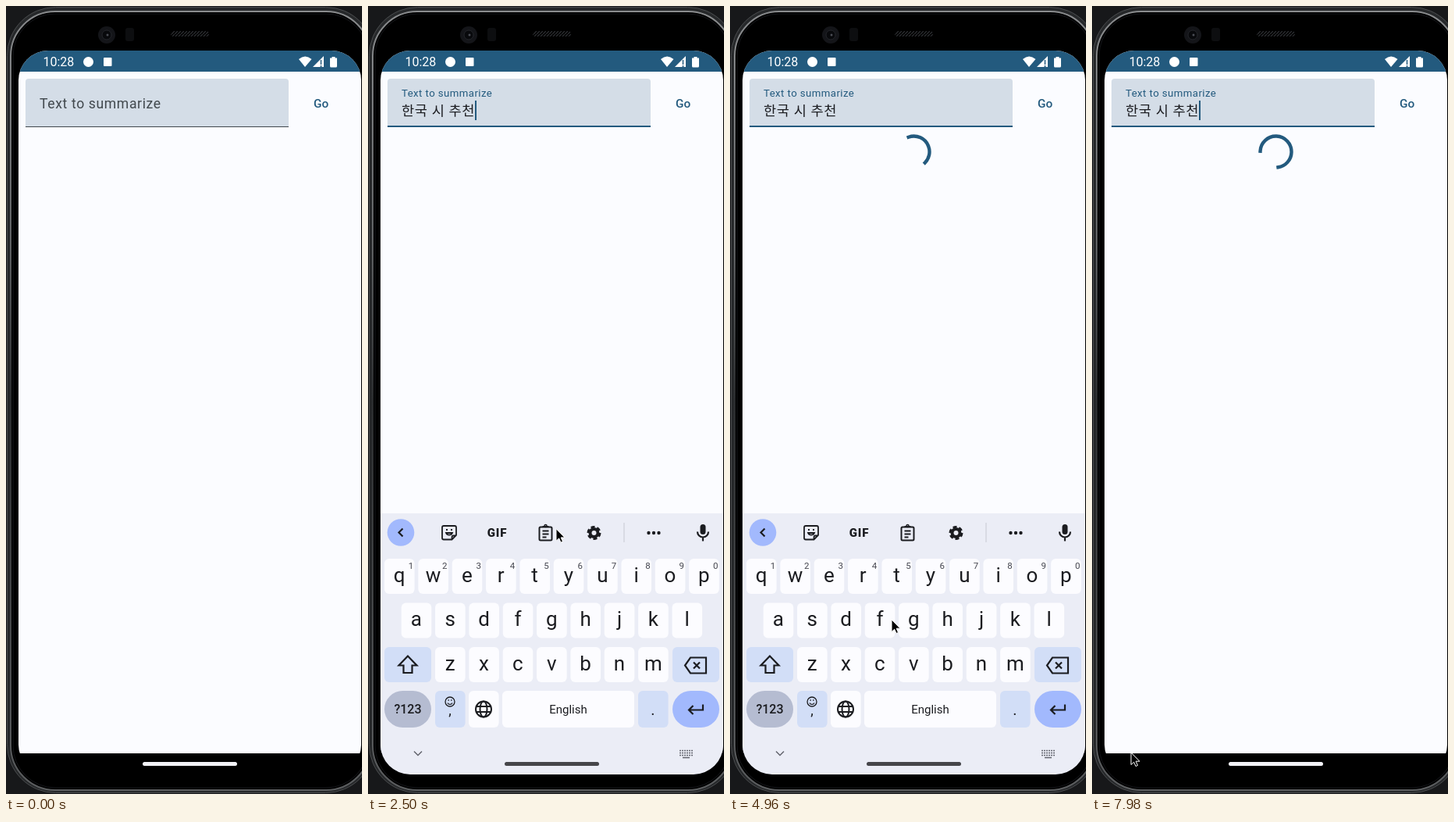
Animation of 456x1008 px, one loop 8 s. Source, as an HTML page:

```html
<!DOCTYPE html>
<html lang="en">
<head>
<meta charset="utf-8">
<title>Summarize</title>
<style>
  html, body { margin: 0; width: 100%; height: 100%; overflow: hidden; background: #17181a; }
  svg {
    --ink: #1b1c20; --primary: #235a7e; --accent: #a2b9fd; --grey: #d2def7;
    display: block; width: 456px; height: 1008px;
    font-family: Roboto, "Noto Sans CJK KR", "Noto Sans CJK", sans-serif;
  }
  .line { fill: none; stroke: var(--ink); stroke-width: 2.2; }
  .faint { fill: none; stroke: #63656e; stroke-width: 1.5; }
  .primary { fill: var(--primary); }
  .page { fill: #fbfcff; }
  .body { font-size: 17.6px; }
  #ime { fill: var(--ink); text-anchor: middle; }
  .accent { fill: var(--accent); }
  .key { fill: #fcfcff; }
  .grey { fill: var(--grey); }
  .pill { fill: #b5bcd1; }
  .letter { font-size: 26px; }
  .hint { font-size: 11.5px; fill: #45464f; }
</style>
</head>
<body>
<svg viewBox="0 0 456 1008">
  <defs>
    <clipPath id="screen">
      <rect x="16" y="57" width="439" height="926" rx="38"/>
    </clipPath>
    <linearGradient id="rim" x2="0" y2="1">
      <stop offset="0" stop-color="#8a8c8e"/>
      <stop offset=".3" stop-color="#606264"/>
      <stop offset=".5" stop-color="#2b2d2f"/>
      <stop offset="1" stop-color="#5c5e60"/>
    </linearGradient>
    <pattern id="mesh" width="4" height="4" patternUnits="userSpaceOnUse">
      <path d="M0 4L4 0" stroke="#303236" stroke-width="1.2"/>
    </pattern>
    <g id="clip" fill="none">
      <rect x="-8" y="-8" width="16" height="17" rx="1.5" stroke-width="2"/>
      <path d="M-4-8.5h8M-4-3h8M-4 1h8M-4 5h5" stroke-width="2"/>
      <circle cy="-9.5" r="1.5" stroke-width="1.5"/>
    </g>
  </defs>

  <!-- phone body -->
  <rect x="1.5" y="1.5" width="470" height="1005" rx="62" fill="#26282a" stroke="#4c4e50"/>
  <rect x="6" y="7" width="461" height="996" rx="57" stroke="url(#rim)" stroke-width="2"/>
  <rect x="9" y="10" width="455" height="990" rx="54" stroke="#15161a"/>
  <circle cx="129" cy="37" r="11" fill="#141519"/>
  <circle cx="129" cy="37" r="6" fill="#08090c" stroke="#24262b"/>
  <circle cx="130" cy="37" r="1.5" fill="#4a4d55"/>
  <rect x="153" y="28" width="11" height="17" rx="3" fill="#0d0e10"/>
  <rect x="211" y="32" width="49" height="7" rx="3.5" fill="url(#mesh)"/>

  <g clip-path="url(#screen)">
    <rect class="page" x="16" y="57" width="439" height="899"/>
    <rect x="16" y="956" width="439" height="27"/>
    <rect class="primary" x="16" y="57" width="439" height="27"/>

    <!-- status bar -->
    <g fill="#fff">
      <text x="47.5" y="77" font-size="16">10:28</text>
      <circle cx="105.5" cy="71.5" r="6.5"/>
      <rect x="125" y="66" width="10.5" height="11" rx="1"/>
      <path d="M375 68Q383 61 391.5 68L383 78Z"/>
      <path d="M393 78L407 64V78Z"/>
      <path class="line" d="M403.5 69v6m0 1v2" style="stroke: var(--primary); stroke-width: 1.5"/>
      <path d="M415 66.5h2.5V65h4v1.5H424V77a1.5 1.5 0 0 1-1.5 1.5h-6A1.5 1.5 0 0 1 415 77Z"/>
    </g>

    <!-- text field -->
    <path d="M25 155V97a4 4 0 0 1 4-4H358a4 4 0 0 1 4 4V155Z" fill="#d4dde7"/>
    <rect id="rule" x="25" width="337"/>
    <text id="label" x="43">Text to summarize</text>
    <text id="value" class="body" x="43" y="140" letter-spacing=".64"></text>
    <rect id="caret" class="primary" width="2" height="25"/>
    <text class="primary" x="394" y="130" font-size="15.4" font-weight="500" letter-spacing=".1">Go</text>

    <circle id="spinner" cx="235.5" cy="186.5" r="20" fill="none" style="stroke: var(--primary)"
      stroke-width="4.4" stroke-linecap="square" pathLength="360"/>

    <!-- keyboard -->
    <g id="ime">
      <rect x="16" y="649" width="439" height="430" fill="#ebedf6"/>
      <g id="keys"></g>

      <circle class="accent" cx="42" cy="673.5" r="17.3"/>
      <path id="arrow" class="line" d="M-2.5-5l5 5-5 5"/>
      <rect x="425.5" y="663" width="7" height="13" rx="3.5"/>
      <path class="line" d="M422 672.5a7 7 0 0 0 14 0M429 680v4.5"/>

      <g id="chip">
        <rect class="key" x="175.5" y="656.5" width="129" height="35" rx="8" stroke="#d6d8e2"/>
        <use href="#clip" x="195" y="674.5" style="stroke: var(--accent)"/>
        <text x="250.5" y="679.5" font-size="16">한국 시 추천</text>
      </g>

      <g id="tools">
        <g class="line" style="stroke-width: 1.8">
          <path d="M97 665h14a2 2 0 0 1 2 2v10l-5.500 5.500H97a2 2 0 0 1-2-2V667a2 2 0 0 1 2-2ZM113 677.500h-3.500a2 2 0 0 0-2 2v3"/>
          <path d="M100 674a4.300 4.300 0 0 0 8 0ZM100 670h2m4 0h2"/>
        </g>
        <text x="165.5" y="679" font-size="15" font-weight="900" letter-spacing=".8">GIF</text>
        <use href="#clip" x="227.5" y="674.5" style="stroke: var(--ink)"/>
        <circle class="line" cx="289.5" cy="674" r="5" style="stroke-width: 4"/>
        <circle class="line" cx="289.5" cy="674" r="7.5" pathLength="48" stroke-dasharray="5 3" style="stroke-width: 3"/>
        <path d="M328 661v25" stroke="#c6c8d2"/>
        <circle cx="359.5" cy="674" r="2.2"/><circle cx="366" cy="674" r="2.2"/><circle cx="372.5" cy="674" r="2.2"/>
      </g>

      <path class="line" d="M51 831.5L39.5 843.5H45.5V853H56.5V843.5H62.5Z"/>
      <path class="line" d="M413 833.5H433V853.5H413L406 843.5ZM417 839.5l8 8m0-8l-8 8"/>
      <path class="line" d="M429 893.5v7H411m5.5-5.5l-5.5 5.5 5.5 5.5"/>
      <g class="line" style="stroke-width: 2">
        <circle cx="148" cy="899.5" r="10"/>
        <ellipse cx="148" cy="899.5" rx="4.5" ry="10"/>
        <path d="M139 896h18m-18 7h18"/>
      </g>
      <g class="line" style="stroke-width: 1.3">
        <circle cx="105" cy="890" r="6"/>
        <path d="M102 891.5a3.3 3.3 0 0 0 6 0M102.5 888h1.4m2.2 0h1.4"/>
      </g>
      <text x="51" y="905" font-size="16" font-weight="500">?123</text>
      <text x="256.5" y="905" font-size="15">English</text>
      <text x="105" y="907" font-size="18">,</text>
      <text x="365" y="907" font-size="20">.</text>

      <rect id="ripple" x="16" y="930" width="95" height="54" rx="47" ry="27" opacity=".1"/>
      <path class="faint" d="M59 953.5l5 5 5-5"/>
      <path class="faint" d="M399 952.5h17m-17 3h17m-17 3h17" stroke-dasharray="2 1"/>
      <path class="faint" d="M403 961.5h9"/>
    </g>

    <rect id="handle" x="175" y="967" width="121" height="5" rx="2.5"/>
  </g>

  <path id="pointer" d="M0 0V15.5L3.7 12.2 6 17.5 8.5 16.4 6.2 11.2H11Z" stroke="#fff"/>
</svg>

<script>
  const LOOP = 8000, STEP = 20;
  const FOCUS = 1000, PASTE = 2380, LOAD = 3910, CLOSE = 5980;
  const PITCH = 43.35, KEY_W = 38.6;
  const $ = id => document.getElementById(id);

  const clamp = x => Math.min(1, Math.max(0, x));
  const ramp = (t, from, to) => clamp((t - from) / (to - from));
  const mix = (a, b, p) => a + (b - a) * p;
  const smooth = p => p * p * (3 - 2 * p);
  const show = (id, on) => $(id).setAttribute('visibility', on ? 'inherit' : 'hidden');
  const set = (id, attrs) => {
    for (const k in attrs) $(id).setAttribute(k, attrs[k]);
  };

  // Interpolates rows of [time, ...values].
  function track(rows, t, ease = p => p) {
    let i = 0;
    while (i < rows.length - 2 && t >= rows[i + 1][0]) i++;
    const [a, b] = [rows[i], rows[i + 1]];
    const p = ease(ramp(t, a[0], b[0]));
    return a.slice(1).map((v, k) => mix(v, b[k + 1], p));
  }

  // cubic-bezier(.4, 0, .2, 1)
  function standard(x) {
    let lo = 0, hi = 1, s = .5;
    for (let i = 0; i < 24; i++) {
      s = (lo + hi) / 2;
      const r = 1 - s;
      if (1.2 * r * r * s + .6 * r * s * s + s ** 3 < x) lo = s; else hi = s;
    }
    return 3 * s * s - 2 * s ** 3;
  }

  function buildKeys() {
    let out = '';
    const key = (x, y, w, cls = 'key', h = 45, r = 6) =>
      out += `<rect class="${cls}" x="${x}" y="${y}" width="${w}" height="${h}" rx="${r}"/>`;
    const text = (x, y, s, cls) => out += `<text class="${cls}" x="${x}" y="${y}">${s}</text>`;
    [['qwertyuiop', 21, 707], ['asdfghjkl', 42.7, 763.5], ['zxcvbnm', 86, 820]].forEach(([row, x0, y], r) =>
      [...row].forEach((c, i) => {
        const x = x0 + i * PITCH;
        key(x, y, KEY_W);
        text(x + 19.2, y + 29.5, c, 'letter');
        if (!r) text(x + 34, y + 13, (i + 1) % 10, 'hint');
      }));
    key(21, 820, 60, 'grey');
    key(390, 820, 60, 'grey');
    key(21, 876, 60, 'pill', 47, 23.5);
    key(86, 876, KEY_W, 'grey', 47);
    key(129, 876, KEY_W, 'key', 47);
    key(172, 876, 169, 'key', 47);
    key(346, 876, KEY_W, 'grey', 47);
    key(390, 876, 60, 'accent', 47, 23.5);
    $('keys').innerHTML = out;
  }

  const pointerPath = [
    [740, -14, 300], [960, 115, 140], [1040, 115, 140], [1400, 197, 127], [1700, 197, 127],
    [2080, 240, 672], [2480, 240, 672], [2920, 405, 125], [3980, 405, 125],
    [4360, 207, 785], [5380, 207, 785], [5740, 50, 955], [LOOP, 50, 955]
  ];
  // Loader time runs about four times faster than the page.
  const loaderClock = [[LOAD, 0], [4960, 4238], [6000, 8434], [7980, 16772], [LOOP, 16856]];
  const imeSlide = [
    [1460, 88, 0], [1540, 0, 1], [CLOSE, 0, 1], [6000, 16, .72], [6040, 88, 0], [LOOP, 88, 0]
  ];
  const handleShade = [[1530, 242], [1560, 200], [1640, 70], [6010, 70], [6110, 242], [LOOP, 242]];

  function drawField(t) {
    const up = smooth(ramp(t, 1020, 1080));
    const focused = t > 1020, pasted = t >= PASTE;
    $('label').style.fontSize = mix(17.6, 13.2, up) + 'px';
    set('label', {
      y: mix(131, 116, up),
      'letter-spacing': mix(.62, .44, up),
      fill: focused ? 'var(--primary)' : '#41484d'
    });
    set('rule', focused ? { y: 153, height: 2, fill: 'var(--primary)' } : { y: 154, height: 1, fill: '#41484d' });
    $('value').textContent = pasted ? '한국 시 추천' : 'Enter text or a URL to summarize';
    set('value', { fill: pasted ? 'var(--ink)' : '#41484d', opacity: ramp(t, 1050, 1110) });

    const blink = (t - (pasted ? PASTE : FOCUS)) % 243 < 121.5;
    show('caret', t >= FOCUS && blink);
    set('caret', { x: pasted ? 137 : 43, y: mix(130, 121, up) });
  }

  function drawSpinner(t) {
    show('spinner', t >= LOAD);
    const [ms] = track(loaderClock, t);
    const turn = Math.floor(ms / 1332), p = ms % 1332;
    const head = 290 * standard(clamp(p / 666));
    const tail = 290 * standard(clamp(p / 666 - 1));
    const start = -90 + 216 * turn + 286 * p / 1332 + tail;
    set('spinner', {
      'stroke-dasharray': `${Math.max(.1, head - tail)} 720`,
      transform: `rotate(${start % 360} 235.5 186.5)`
    });
  }

  function drawKeyboard(t) {
    const closing = t >= CLOSE, menu = t >= PASTE && !closing;
    const [drop, alpha] = track(imeSlide, t);
    set('ime', { transform: `translate(0 ${drop})`, opacity: alpha });
    show('ime', alpha > 0);
    show('chip', t < PASTE);
    show('tools', menu);
    show('ripple', closing);
    set('arrow', { transform: `translate(42 673.5) scale(${menu ? -1 : 1} 1)` });
    const [shade] = track(handleShade, t);
    set('handle', { fill: `rgb(${shade} ${shade} ${shade + 4})` });
  }

  function render() {
    const t = Math.floor(performance.now() % LOOP / STEP) * STEP;
    drawField(t);
    drawSpinner(t);
    drawKeyboard(t);
    show('pointer', t >= 740);
    set('pointer', { transform: `translate(${track(pointerPath, t, smooth)})` });
    requestAnimationFrame(render);
  }

  buildKeys();
  render();
</script>
</body>
</html>
```
